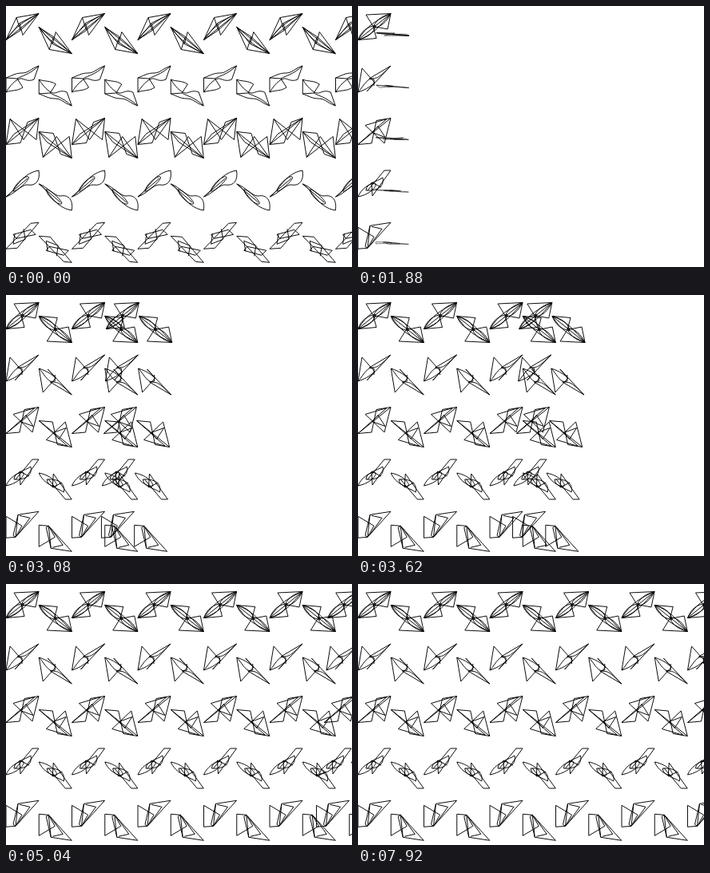
An HTML page with a canvas that plays this animation: 433x327 px, repeating every 8380 ms.

```html
<!DOCTYPE html>
<html lang="en">
<head>
<meta charset="utf-8">
<title>Glide reflection friezes</title>
<style>
  html, body { margin: 0; width: 100%; height: 100%; overflow: hidden; background: #fff; }
  canvas { display: block; width: 433px; height: 327px; }
</style>
</head>
<body>
<canvas id="stage"></canvas>
<script>
const W = 433, H = 327, LOOP = 8380;
const STEP = 82.5;          // one translation of the frieze
const AXIS = 25;            // mirror line below the top of a row
const CLEAR = 820, GLIDE = 1290;

// motifs in a 41 x 33 box, tip at the upper right
const before = [
  'M0 33L13 5L41 0L21 27L17 12L41 0L0 33 M13 5L18 21L41 0' +
  'M0 33L17 12 M0 33L18 21 M0 33C10 18 24 8 41 0',
  'M0 33V15C8 12 12 9 20 9S30 4 41 0L35 17C28 20 24 17 20 16S8 20 0 33' +
  'M0 33C7 30 14 32 21 27L14 16L0 15 M14 16C20 12 28 12 41 0',
  'M0 33L5 1L22 27L41 0L38 27L5 1 M0 33L41 0 M0 33L10 20L41 0' +
  'M0 33L18 31L27 5L41 0',
  'M0 33C12 26 18 4 41 0C43 12 38 20 27 18C20 17 10 30 0 33' +
  'M9 26C10 18 24 6 28 8S12 28 9 26 M0 33L27 10',
  'M0 33L31 1L41 0L14 32Z M9 15L31 9L37 15L13 20Z M11 14L9 27L24 21L22 8'
];
const after = [
  'M0 33L23 31L19 16L10 1.5L41 0L37 19.5L19 16 M0 33L41 0' +
  'M0 33C4 22 12 16 22 15C20 24 12 30 0 33' +
  'M41 0C30 3 21 9 19 18C29 17 36 10 41 0' +
  'M0 33C12 14 24 8 41 0 M0 33C18 27 27 16 41 0',
  'M0 33L5 3L21 21L11 32L41 0L14 16L20 17L20 25' +
  'M0 33C6 27 10 17 17 16S24 17 41 0 M0 33C12 29 16 25 21 21',
  'M0 33L17 31.5L23 3L41 0L33 31.5L9 9L36 1L0 33 M0 33L41 0' +
  'M25 10L18 18L34 24Z',
  'M33 0H41L18 32L17 15L29 21 M33 0L12 25' +
  'M0 33C4 23 14 17 20 16S20 29 0 33' +
  'M10 25C10 16 24 14 31 9C33 19 26 26 10 25',
  'M0 33V6L20 18L12 32Z M41 0L15 4L12 32Z M17 5L30 8L14 30 M15 4L9 30L12 32'
];
// top of each row, start of its translations, time for each of them
const rows = [
  [9.5, 2195, 583],
  [75, 2200, 584.5],
  [140.5, 2212, 586],
  [206, 2211, 597],
  [271.3, 2211, 601]
];

const toPaths = list => list.map(d => new Path2D(d));
const oldSet = toPaths(before), newSet = toPaths(after);
const canvas = document.getElementById('stage');
const ctx = canvas.getContext('2d');
const dpr = window.devicePixelRatio || 1;
canvas.width = W * dpr;
canvas.height = H * dpr;

// glide 0 is the plain motif, glide 1 the shifted mirror image
function motif(path, x, top, glide) {
  ctx.save();
  ctx.translate(x + glide * STEP / 2, top + AXIS);
  ctx.scale(1, 1 - 2 * glide);
  ctx.translate(0, -AXIS);
  ctx.stroke(path);
  ctx.restore();
}

function pair(path, x, top) {
  motif(path, x, top, 0);
  motif(path, x, top, 1);
}

function drawRow(i, t) {
  const [top, start, span] = rows[i];
  if (t < CLEAR) {
    for (let k = 0; k < 6; k++) pair(oldSet[i], k * STEP, top);
    return;
  }
  const path = newSet[i];
  if (t < start) {
    motif(path, 0, top, 0);
    const u = Math.max(0, (t - GLIDE) / (start - GLIDE));
    if (u > 0) motif(path, 0, top, Math.pow(u, 1.38));
    return;
  }
  const moved = Math.min(6, (t - start) / span);
  const done = Math.floor(moved);
  for (let k = 0; k <= done; k++) pair(path, k * STEP, top);
  if (moved > done) pair(path, moved * STEP, top);
}

function frame() {
  const t = performance.now() % LOOP;
  ctx.setTransform(dpr, 0, 0, dpr, 0, 0);
  ctx.fillStyle = '#fff';
  ctx.fillRect(0, 0, W, H);
  ctx.strokeStyle = '#000';
  ctx.lineWidth = 0.95;
  rows.forEach((_, i) => drawRow(i, t));
  requestAnimationFrame(frame);
}
frame();
</script>
</body>
</html>
```
